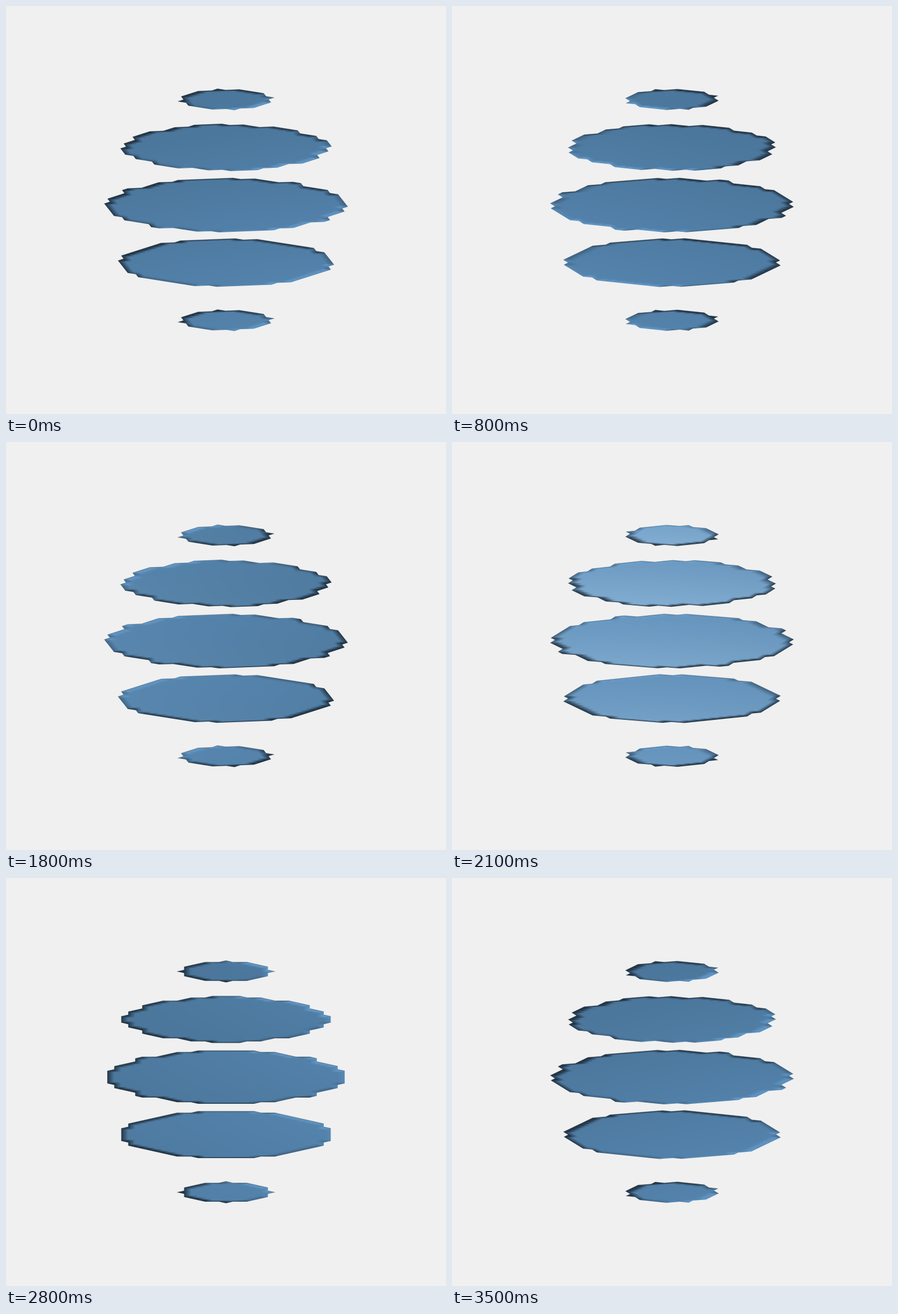
These frames come from a looping animation (777x721 px, 3.6 s). An HTML page with a canvas:

```html
<!DOCTYPE html>
<html lang="en">
<head>
<meta charset="utf-8">
<title>Rotating slices</title>
<style>
html, body { margin: 0; width: 100%; height: 100%; overflow: hidden; background: #f0f0f0; }
canvas { display: block; }
</style>
</head>
<body>
<canvas id="stage" width="777" height="721"></canvas>
<script>
const ctx = document.getElementById('stage').getContext('2d');
const CX = 388.5, SX = 12.33, SY = 2.76;   // centre and pixels per cell
const HALF = 20, SIZE = 2 * HALF + 1;
const LOOP = 3600, STEP = 100;
const RAD = Math.PI / 180;
const VIEW = { flat: 0.975, up: 0.223 };
const LIGHT = { x: 140 * Math.cos(65 * RAD), y: 140 * Math.sin(65 * RAD), z: 130 };
const BASE = [112, 175, 230];

// Outline corners within one eighth of each slice; the rest is mirrored.
const small = [[7, 0], [6, 1], [6, 3]];
const slices = [
  [165.3, small],
  [250.1, [[15, 2], [14, 3], [14, 5], [12, 7], [12, 9]]],
  [352, [[17, 4], [16, 5], [16, 7], [13, 10], [13, 12]]],
  [453.6, [[15, 4], [14, 5], [14, 7]]],
  [555.5, small]
].map(([cy, eighth]) => makeSlice(cy, eighth));

function makeSlice(cy, eighth) {
  const quarter = eighth.concat(eighth.slice().reverse().map(([x, y]) => [y, x]));
  const points = [];
  for (let q = 0; q < 4; q++) {
    for (const [x, y] of quarter) {
      points.push([[x, y], [-y, x], [-x, -y], [y, -x]][q]);
    }
  }
  const path = new Path2D();
  points.forEach(([x, y]) => path.lineTo(x, y));
  path.closePath();

  const inside = (x, y) => ctx.isPointInPath(path, x * 0.995, y * 0.995);
  const normals = [];
  for (let y = -HALF; y <= HALF; y++) {
    for (let x = -HALF; x <= HALF; x++) {
      let nx = 0, ny = 0;
      for (let dy = -1; dy <= 1; dy++) {
        for (let dx = -1; dx <= 1; dx++) {
          if (!inside(x + dx, y + dy)) { nx += dx; ny += dy; }
        }
      }
      const len = Math.hypot(nx, ny, 1);
      normals.push([nx / len, ny / len, 1 / len]);
    }
  }
  const tex = document.createElement('canvas');
  tex.width = tex.height = SIZE;
  const tctx = tex.getContext('2d');
  return { cy, z: (352 - cy) / 12.05, points, path, normals, tex, tctx,
           pixels: tctx.createImageData(SIZE, SIZE) };
}

// One texel per grid point, blended smoothly when drawn.
function shade(slice, sin, cos) {
  const { data } = slice.pixels;
  slice.normals.forEach(([nx, ny, nz], i) => {
    let lx = LIGHT.x - (i % SIZE - HALF);
    let ly = LIGHT.y - (Math.floor(i / SIZE) - HALF);
    let lz = LIGHT.z - slice.z;
    const len = Math.hypot(lx, ly, lz);
    lx /= len; ly /= len; lz /= len;
    const diffuse = 0.3 + 0.6 * Math.max(0, nx * lx + ny * ly + nz * lz);
    const mirror = Math.max(0, (lx * sin - ly * cos) * VIEW.flat + lz * VIEW.up);
    const gloss = 190 * Math.pow(mirror, 12) * nz * nz;
    BASE.forEach((c, k) => { data[i * 4 + k] = c * diffuse + gloss; });
    data[i * 4 + 3] = 255;
  });
  slice.tctx.putImageData(slice.pixels, 0, 0);
}

function drawSlice(slice, sin, cos) {
  shade(slice, sin, cos);
  ctx.save();
  ctx.setTransform(SX * cos, -SY * sin, SX * sin, SY * cos, CX, slice.cy);
  ctx.clip(slice.path);
  ctx.drawImage(slice.tex, -HALF - 0.5, -HALF - 0.5);
  ctx.restore();

  // thin dark rim along the far side
  const flat = slice.points.map(([x, y]) =>
    [CX + SX * (x * cos + y * sin), slice.cy + SY * (y * cos - x * sin)]);
  ctx.beginPath();
  flat.forEach(([x, y], i) => {
    const [u, v] = flat[(i + 1) % flat.length];
    if (u > x) { ctx.moveTo(x, y); ctx.lineTo(u, v); }
  });
  ctx.stroke();
}

function draw(time) {
  const t = Math.floor((time % LOOP) / STEP) * STEP;
  const angle = (100 - t) / 10 * RAD;
  const sin = Math.sin(angle), cos = Math.cos(angle);
  ctx.fillStyle = '#f0f0f0';
  ctx.fillRect(0, 0, 777, 721);
  ctx.lineWidth = 0.8;
  ctx.strokeStyle = 'rgba(30, 50, 72, 0.5)';
  slices.forEach(s => drawSlice(s, sin, cos));
}

ctx.imageSmoothingEnabled = true;
ctx.imageSmoothingQuality = 'low';
const start = performance.now();
function tick() {
  draw(performance.now() - start);
  requestAnimationFrame(tick);
}
tick();
</script>
</body>
</html>
```
